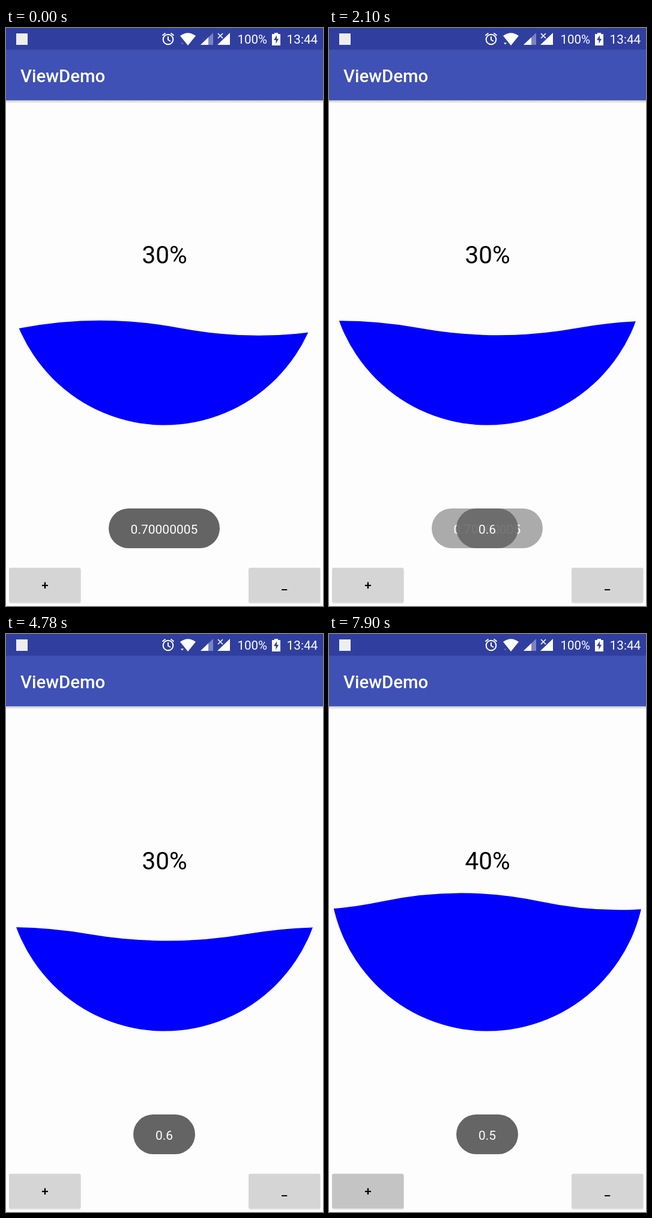
Animation of 528 by 960 pixels, one loop 8000 ms. Source, as an HTML page:

```html
<!DOCTYPE html>
<html lang="en">
<head>
<meta charset="utf-8">
<title>ViewDemo</title>
<style>
  html, body { margin: 0; width: 100%; height: 100%; overflow: hidden; background: #fdfdfd; }
  svg { display: block; width: 528px; height: 960px; font-family: Roboto, sans-serif; }
  .mid { text-anchor: middle; }
  .medium { font-weight: 500; }
  .toast text { font-size: 21px; fill: #fff; text-anchor: middle; }
  .toast rect { fill: #646464; }
</style>
</head>
<body>
<svg viewBox="0 0 528 960">
  <defs>
    <clipPath id="bowl"><circle cx="264" cy="396.5" r="263"/></clipPath>
    <linearGradient id="shade" x2="0" y2="1">
      <stop offset="0" stop-color="#c4c4c4"/>
      <stop offset="1" stop-color="#fdfdfd"/>
    </linearGradient>
  </defs>
  <rect width="528" height="960" fill="#fdfdfd"/>

  <rect y="120" width="528" height="5" fill="url(#shade)"/>
  <rect y="36" width="528" height="84" fill="#3f51b5"/>
  <rect width="528" height="36" fill="#303f9f"/>
  <text class="medium" x="24" y="90" font-size="29.33" fill="#fff">ViewDemo</text>

  <g fill="#fff">
    <rect x="17" y="9" width="19" height="19" fill="#eee"/>
    <g fill="none" stroke="#fff" stroke-width="2">
      <circle cx="270" cy="19" r="8.3"/>
      <path d="M270 14V19.5L274 22M260.5 12.5L265.5 8.5M279.5 12.5L274.5 8.5"/>
    </g>
    <path d="M290 13Q303 3.5 316 13L303 29Z"/>
    <path id="traffic" d="M291 24.5H296L293.5 27.5Z"/>
    <path d="M324 28L345 8V28Z" fill="#7b84c0"/>
    <path d="M324 28L337 15.5V28Z"/>
    <path d="M352 28L373 8V28Z"/>
    <path d="M353 9L361 17M361 9L353 17" stroke="#fff" stroke-width="1.7"/>
    <path d="M443 10H447V8H453V10H457V29H443Z"/>
    <path d="M451 12L446 20H449.5V26L454 18H451Z" fill="#303f9f"/>
    <text x="385.5" y="26" font-size="20.5">100%</text>
    <text x="467.5" y="26" font-size="20.8">13:44</text>
  </g>

  <text id="percent" class="mid" x="264" y="391" font-size="40.5"></text>
  <path id="water" clip-path="url(#bowl)" fill="#0000fe"/>

  <g class="mid medium" font-size="20.5">
    <rect x="5" y="898" width="119.5" height="58" rx="3" fill="#e4e4e4"/>
    <rect x="404" y="898" width="119.5" height="58" rx="3" fill="#e4e4e4"/>
    <rect id="plus" x="5" y="896.5" width="119.5" height="57.5" rx="3"/>
    <rect x="404" y="896.5" width="119.5" height="57.5" rx="3" fill="#d5d5d6"/>
    <text x="65" y="932">+</text>
    <text x="463.5" y="932">_</text>
  </g>
  <g id="toasts"></g>
</svg>
<script>
const LOOP = 8000, PRESS = 161;
const $ = id => document.getElementById(id);

// [step, crest x], interpolated linearly
const CREST = [[0, 157], [27, 374], [45, 546], [69, 763], [103, 1061],
               [148, 1460], [PRESS, 1574]];

const TOASTS = [
  { text: "0.70000005", width: 185, from: -20, to: 38, fade: 15 },
  { text: "0.6", width: 103, from: 38, to: 150, fade: 11 },
  { text: "0.5", width: 103, from: PRESS, to: 999, fade: 11 }
];

for (const toast of TOASTS) {
  $("toasts").insertAdjacentHTML("beforeend",
    `<g class="toast"><rect x="${263.5 - toast.width / 2}" y="798" width="${toast.width}"
      height="66" rx="33"/><text x="263.5" y="839.5">${toast.text}</text></g>`);
  toast.node = $("toasts").lastElementChild;
}

const clamp = v => Math.min(1, Math.max(0, v));

// Steps come in threes lasting 20, 20 and 100 ms, with one extra 20 ms step at 4200.
function stepAt(ms) {
  const late = ms >= 4220, t = late ? ms - 20 : ms, r = t % 140;
  return 3 * Math.floor(t / 140) + (r < 20 ? 0 : r < 40 ? 1 : 2) + (late ? 1 : 0);
}

function crestAt(step) {
  if (step >= PRESS) return 132 + 8.8 * (step - PRESS);
  const i = CREST.findIndex(([s]) => s > step);
  const [s0, x0] = CREST[i - 1], [s1, x1] = CREST[i];
  return x0 + (x1 - x0) * (step - s0) / (s1 - s0);
}

function wavePath(crest, mid, height) {
  const start = crest % 528 - 660;
  let d = `M${start} ${mid}`;
  for (let i = 0; i < 6; i++)
    d += `q132 ${(i % 2 ? 2 : -2) * height} 264 0`;
  return d + `V700H${start}Z`;
}

function toastAlpha({ from, to, fade }, step) {
  const enter = clamp((step - from) / 11);
  const leave = clamp((step - to) / fade);
  return (1 - (1 - enter) ** 2) * (1 - leave);
}

function draw(ms) {
  const step = stepAt(ms), pressed = step >= PRESS;
  const mid = pressed ? 444.3 : 498.3;
  const height = pressed ? 14 : 12.5 - 0.012 * step;
  $("water").setAttribute("d", wavePath(crestAt(step), mid, height));
  $("percent").textContent = pressed ? "40%" : "30%";
  $("plus").setAttribute("fill", pressed ? "#c4c4c5" : "#d5d5d6");
  $("traffic").setAttribute("opacity", step >= 40 && !pressed ? 1 : 0.25);
  for (const toast of TOASTS)
    toast.node.setAttribute("opacity", toastAlpha(toast, step));
}

const begin = performance.now();
function tick() {
  draw((performance.now() - begin) % LOOP);
  requestAnimationFrame(tick);
}
tick();
</script>
</body>
</html>
```
